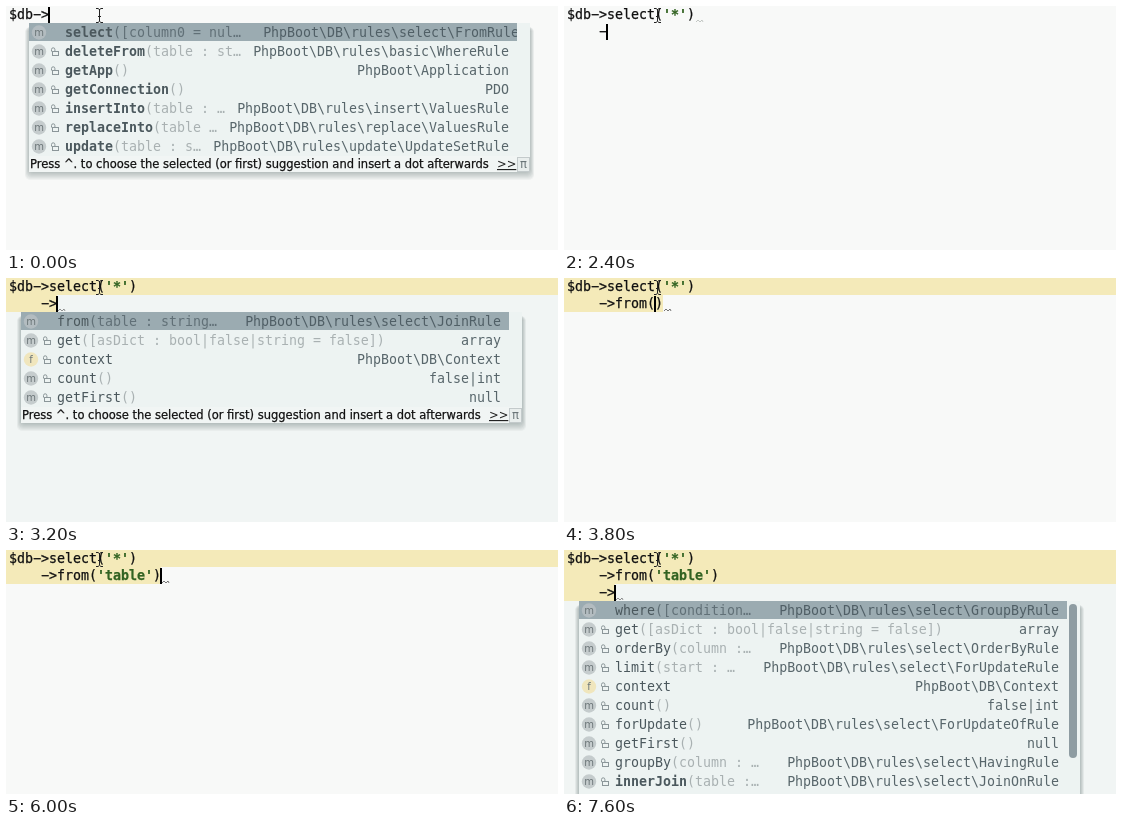
Animation, 552 px wide and 244 px high, one loop 8000 ms. Source, as an HTML page:

```html
<!DOCTYPE html>
<html>
<head>
<meta charset="utf-8">
<style>
  html, body { margin: 0; width: 552px; height: 244px; overflow: hidden; background: #f8f9f8; }
  svg { display: block; }
  text, tspan { fill: currentColor; }
  text { white-space: pre; font: 13.29px "DejaVu Sans Mono", monospace; }
  .ui { font: 11.5px "DejaVu Sans", sans-serif; }
  .icon { font: 10px "DejaVu Sans", sans-serif; text-anchor: middle; }
  .strong, .strong tspan { stroke: currentColor; stroke-width: .25px; }
  .bold { font-weight: bold; }
  .end { text-anchor: end; }
</style>
</head>
<body>
<svg id="stage" width="552" height="244"></svg>
<script>
const WIDTH = 552, COL = 8, LINE = 17, ROW = 19, LEFT = 3, LOOP = 8000;
const POPUP_W = 501, GUTTER = 13;
const RULES = 'PhpBoot\\DB\\rules\\';
const stage = document.getElementById('stage');

const rect = (x, y, w, h, fill, extra = '') =>
  `<rect x="${x}" y="${y}" width="${w}" height="${h}" fill="${fill}" ${extra}/>`;
const text = (x, y, s, color, cls = '') =>
  `<text x="${x}" y="${y}" color="${color}" class="${cls}">${s}</text>`;
const path = (d, stroke, width = 1) =>
  `<path d="${d}" fill="none" stroke="${stroke}" stroke-width="${width}"/>`;

// Popup items: [name, parameters, result type, style]; style b = bold, f = field
const queryItems = [
  ['select', '([column0 = nul…', RULES + 'select\\FromRule', 'b'],
  ['deleteFrom', '(table : st…', RULES + 'basic\\WhereRule', 'b'],
  ['getApp', '()', 'PhpBoot\\Application', 'b'],
  ['getConnection', '()', 'PDO', 'b'],
  ['insertInto', '(table : …', RULES + 'insert\\ValuesRule', 'b'],
  ['replaceInto', '(table …', RULES + 'replace\\ValuesRule', 'b'],
  ['update', '(table : s…', RULES + 'update\\UpdateSetRule', 'b']
];
const getItem = ['get', '([asDict : bool|false|string = false])', 'array'];
const contextItem = ['context', '', 'PhpBoot\\DB\\Context', 'f'];
const countItem = ['count', '()', 'false|int'];
const firstItem = ['getFirst', '()', 'null'];
const fromItems = [
  ['from', '(table : string…', RULES + 'select\\JoinRule'],
  getItem, contextItem, countItem, firstItem
];
const whereItems = [
  ['where', '([condition…', RULES + 'select\\GroupByRule'],
  getItem,
  ['orderBy', '(column :…', RULES + 'select\\OrderByRule'],
  ['limit', '(start : …', RULES + 'select\\ForUpdateRule'],
  contextItem, countItem,
  ['forUpdate', '()', RULES + 'select\\ForUpdateOfRule'],
  firstItem,
  ['groupBy', '(column : …', RULES + 'select\\HavingRule'],
  ['innerJoin', '(table :…', RULES + 'select\\JoinOnRule', 'b']
];

const queryPopup = { x: 23, y: 17, items: queryItems, rows: 7, shift: 10 };
const fromPopup = { x: 15, y: 34, items: fromItems, rows: 5 };
const wherePopup = { x: 15, y: 51, items: whereItems, rows: 11, scroll: true };

function drawItem({ x, y, shift = 0 }, [name, params, type, style], i) {
  const mid = y + 9.5 + ROW * i, base = mid + 4.5, first = i === 0;
  const field = style === 'f';
  const disc = field ? '#f0e6bd' : first ? '#b3bcc0' : '#c5cccd';
  const lock = path(`M${x + 22.5} ${mid}v-2a1.7 1.7 0 0 1 3.4 0v2`, '#8b9699')
    + rect(x + 23.5, mid, 6, 4, 'none', 'stroke="#8b9699"');
  return `<circle cx="${x + 10}" cy="${mid}" r="7.2" fill="${disc}"/>`
    + text(x + 10, mid + 3.5, field ? 'f' : 'm', '#6c7678', 'icon')
    + (first ? '' : lock)
    + text(x + 36, base, name, '#4b585d', style === 'b' ? 'bold' : '')
    + text(x + 36 + name.length * COL, base, params, first ? '#617077' : '#a9b1b2')
    + text(x + 480 + (first ? shift : 0), base, type, first ? '#505f66' : '#58666b', 'end');
}

function drawPopup(p) {
  const { x, y, items, rows, scroll } = p, bg = '#edf3f2';
  const listH = rows * ROW, h = listH + 16, foot = y + listH, right = x + POPUP_W;
  let s = '';
  for (let i = 8; i > 0; i--)
    s += rect(x - i / 2, y + 4, POPUP_W + i, h - 4 + i, '#263a40', 'opacity=".04" rx="5"');
  s += rect(x, y, POPUP_W, h, bg, 'rx="2"') + rect(x, y, POPUP_W - GUTTER, 18, '#9babb1');
  s += items.map((item, i) => drawItem(p, item, i)).join('');
  s += rect(right - GUTTER, y, GUTTER, listH, bg);
  if (scroll) s += rect(right - 11, y + 3, 8, 154, '#8e9ca2', 'rx="4"');
  return s + rect(x, foot, POPUP_W, 16, '#f1f5f4')
    + text(x + 1, foot + 12, 'Press ^. to choose the selected (or first) suggestion and insert a dot afterwards', '#111', 'ui strong')
    + text(right - 33, foot + 12, '<tspan text-decoration="underline">&gt;&gt;</tspan>', '#222', 'ui')
    + rect(right - 12.5, foot + 1.5, 12, 14, '#e9eeed', 'stroke="#c3cacb"')
    + text(right - 10, foot + 12, 'π', '#6a7578', 'ui');
}

// Steps: [start, lines, caret row, caret column, options]
// band = last row of the highlighted statement, mark = [row, colour] of the squiggle
const L1 = "$db->select('*')", L2 = "    ->from('table')";
const arrow = '    ->', dash = '    -';
const from = s => [L1, `    ->from(${s})`];
const open = { band: 1, mark: [1, '#555'] };
const typing = [...'table'].map((c, i) =>
  [4800 + 200 * i, from(`'${'table'.slice(0, i + 1)}'`), 1, 13 + i, open]);
const steps = [
  [0, ['$db->'], 0, 5, { popup: queryPopup }],
  [200, ['$db->select()'], 0, 12, {}],
  [600, ["$db->select('')"], 0, 13, { weak: true }],
  [800, [L1], 0, 14, { weak: true }],
  [1000, [L1], 0, 14, { weak: true, mark: [0] }],
  [1400, [L1], 0, 15, { mark: [0] }],
  [1600, [L1], 0, 16, { mark: [0] }],
  [2000, [L1, ''], 1, 4, { mark: [0] }],
  [2400, [L1, dash], 1, 5, { mark: [0] }],
  [2800, [L1, arrow], 1, 6, {}],
  [3000, [L1, arrow], 1, 6, { popup: fromPopup }],
  [3200, [L1, arrow], 1, 6, { popup: fromPopup, band: 1, mark: [1, '#777'] }],
  [3600, from(''), 1, 11, open],
  [4400, from("''"), 1, 12, open],
  ...typing,
  [5800, [L1, L2], 1, 18, open],
  [6000, [L1, L2], 1, 19, open],
  [6400, [L1, L2, ''], 2, 4, open],
  [6600, [L1, L2, ''], 2, 4, { band: 1, mark: [1] }],
  [7000, [L1, L2, dash], 2, 5, { mark: [1] }],
  [7200, [L1, L2, arrow], 2, 6, {}],
  [7400, [L1, L2, arrow], 2, 6, { popup: wherePopup }],
  [7600, [L1, L2, arrow], 2, 6, { popup: wherePopup, band: 2, mark: [2, '#777'] }]
];

const lineEnd = line => LEFT + line.length * COL;

// The wide minus meets the arrow head as one sign
function drawCode(line, row, weak) {
  const style = weak ? 'color="#829a80"' : 'color="#326322" class="bold"';
  const body = line.replace('-', '−').replace('>', '&gt;')
    .replace(/'.*'/, s => `<tspan ${style}>${s}</tspan>`);
  return text(LEFT, 13 + LINE * row, body, '#111', 'strong');
}

function draw([, lines, row, col, { popup, band = -1, mark, weak }]) {
  let s = popup && band > 0 ? rect(0, 0, WIDTH, 244, '#f1f5f4') : '';
  for (let i = 0; i <= band; i++)
    s += rect(0, LINE * i, i < band ? WIDTH : lineEnd(lines[i]), LINE, '#f4eab9');
  s += lines.map((line, i) => drawCode(line, i, weak)).join('');
  if (mark) {
    const [r, color = '#b5bab6'] = mark;
    s += path(`M${lineEnd(lines[r]) + 1} ${LINE * r + 16}l2-2 2 2 2-2 1 2`, color, 0.8);
  }
  if (popup) s += drawPopup(popup);
  s += rect(LEFT + col * COL - 1, LINE * row + 1, 2, 16, '#000');
  s += path('M90 2.5h2l1.5 1 1.5-1h2M93.5 3v12M90 16.5h2l1.5-1 1.5 1h2M92 10.5h3', '#222');
  stage.innerHTML = s;
}

let shown;
function tick() {
  const t = performance.now() % LOOP;
  const step = steps.findLast(([start]) => start <= t);
  if (step !== shown) draw(shown = step);
  requestAnimationFrame(tick);
}
tick();
</script>
</body>
</html>
```
